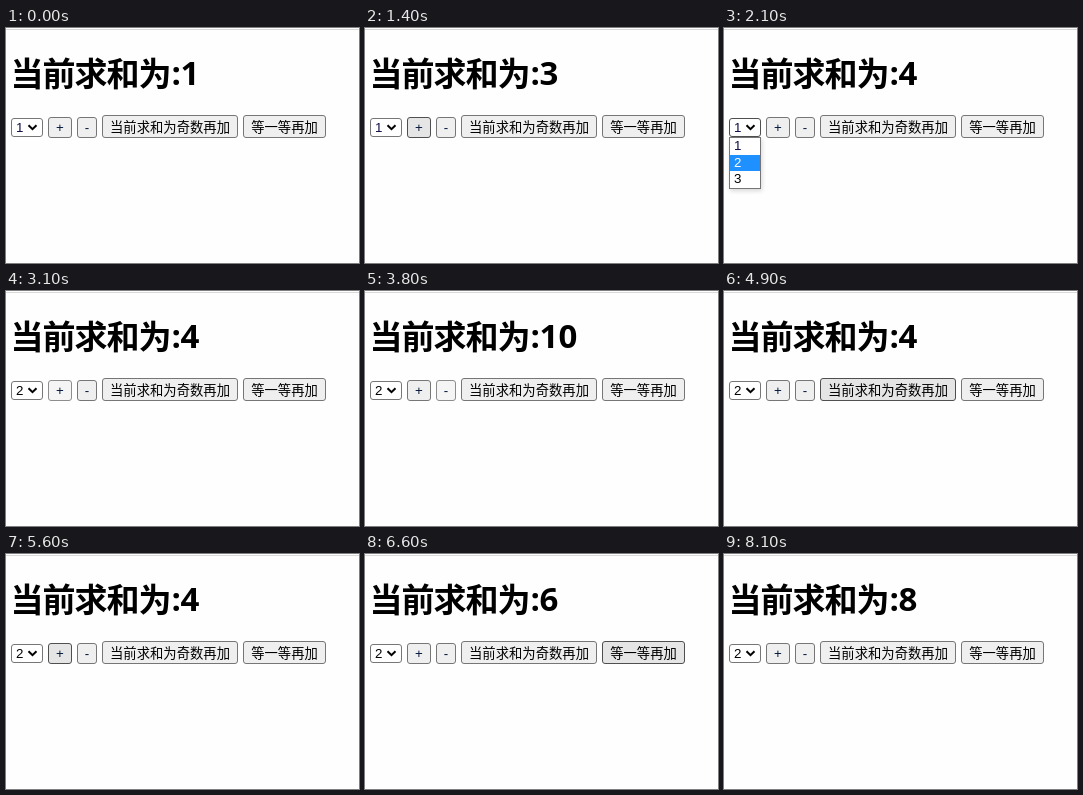
An HTML page that plays this animation: 353x235 px, repeating every 8500 ms.

```html
<!DOCTYPE html>
<html lang="zh-CN">
<head>
<meta charset="utf-8">
<title>求和</title>
<style>
  html, body { margin: 0; width: 100%; height: 100%; overflow: hidden; background: #fefefe; }
  svg { display: block; width: 353px; height: 235px; }
  text { font: 13.333px "Liberation Sans", Arial, "Noto Sans CJK SC", sans-serif; }
  .title { font: bold 33px "Noto Sans CJK SC", "Noto Sans CJK", sans-serif; letter-spacing: -1px; }
  .latin { font-family: "Open Sans", "Noto Sans", sans-serif; letter-spacing: 0; }
  .control rect { fill: #efefef; stroke: #767676; }
  .control text { text-anchor: middle; }
  .cjk text { font-family: "Noto Sans CJK SC", "Noto Sans CJK", sans-serif; font-weight: 300; }
  .hover rect { fill: #e5e5e5; stroke: #4f4f4f; }
  .press rect { fill: #f5f5f5; stroke: #8d8d8d; }
  .select rect { fill: #fff; stroke: #767676; }
  .select.hover rect { stroke: #4f4f4f; }
  .ink { fill: #001538; }
  .menu { filter: drop-shadow(1px 2px 2px rgba(0, 0, 0, .15)); }
</style>
</head>
<body>
<svg viewBox="0 0 353 235">
  <rect width="353" height="235" fill="#fefefe"/>
  <rect y="1" width="353" height="1" fill="#d9d9d9"/>
  <text class="title" x="4.5" y="58">当前求和为</text>
  <text class="title latin" x="165.5" y="57">:</text>
  <text class="title latin" id="sum" x="174.6" y="57">1</text>

  <g class="select" id="select">
    <rect x="5.5" y="90.5" width="31" height="18" rx="2.5"/>
    <text id="value" x="10" y="104">1</text>
    <path d="M22.5 97.2 L26.5 101.2 L30.5 97.2" fill="none" stroke="#000" stroke-width="2"/>
  </g>

  <g class="control" id="plus">
    <rect x="42.5" y="89.5" width="23" height="20" rx="2.5"/>
    <text class="ink" x="54" y="104">+</text>
  </g>
  <g class="control" id="minus">
    <rect x="71.5" y="89.5" width="19" height="20" rx="2.5"/>
    <text class="ink" x="81" y="104">-</text>
  </g>
  <g class="control cjk" id="odd">
    <rect x="96.5" y="87.5" width="135" height="22" rx="2.5"/>
    <text x="164" y="104">当前求和为奇数再加</text>
  </g>
  <g class="control cjk" id="wait">
    <rect x="237.5" y="87.5" width="82" height="22" rx="2.5"/>
    <text x="278.5" y="104">等一等再加</text>
  </g>

  <g class="menu" id="menu">
    <rect x="5.5" y="109.5" width="31" height="51" fill="#fff" stroke="#767676"/>
    <rect id="mark" x="6" y="127" width="30" height="16" fill="#1e90ff"/>
    <text x="10" y="122">1</text>
    <text x="10" y="139">2</text>
    <text x="10" y="155">3</text>
  </g>
</svg>
<script>
const LOOP = 8500;
const $ = id => document.getElementById(id);
const buttons = ['plus', 'minus', 'odd', 'wait'];
const options = [...$('menu').querySelectorAll('text')];

const start = { sum: 1, value: 1, over: '', down: false, select: false, menu: 0, mark: 1 };

// Each entry: time in ms and what changes then.
const steps = [
  [700, { over: 'plus' }],
  [1200, { down: true }],
  [1300, { down: false, sum: 2 }],
  [1400, { sum: 3 }],
  [1500, { sum: 4 }],
  [1700, { over: '', select: true }],
  [1900, { menu: 0.5 }],
  [2000, { menu: 1 }],
  [2100, { mark: 2 }],
  [2600, { menu: 0, value: 2 }],
  [2800, { over: 'plus' }],
  [3100, { down: true, select: false }],
  [3200, { down: false, sum: 6 }],
  [3300, { sum: 8 }],
  [3400, { sum: 10 }],
  [3600, { over: 'minus' }],
  [3800, { down: true }],
  [3900, { down: false, sum: 8 }],
  [4000, { sum: 6 }],
  [4100, { sum: 4 }],
  [4200, { over: '' }],
  [4300, { over: 'odd' }],
  [4500, { down: true }],
  [4600, { down: false }],
  [4800, { down: true }],
  [4900, { down: false }],
  [5100, { down: true }],
  [5200, { down: false }],
  [5400, { over: 'minus' }],
  [5600, { over: 'plus' }],
  [5900, { down: true }],
  [6000, { down: false, sum: 6 }],
  [6100, { over: 'odd' }],
  [6400, { over: 'wait' }],
  [6500, { down: true }],
  [6600, { down: false }],
  [7800, { sum: 8 }],
  [8100, { over: '' }]
];

function stateAt(time) {
  const state = { ...start };
  for (const [at, change] of steps) {
    if (at > time) break;
    Object.assign(state, change);
  }
  return state;
}

function draw(state) {
  $('sum').textContent = state.sum;
  $('value').textContent = state.value;
  $('value').style.fill = state.value === 1 ? '#101048' : '#000';
  $('select').classList.toggle('hover', state.select);
  for (const id of buttons) {
    const over = state.over === id;
    $(id).classList.toggle('hover', over && !state.down);
    $(id).classList.toggle('press', over && state.down);
  }
  $('menu').style.opacity = state.menu;
  $('mark').setAttribute('y', 110 + 17 * (state.mark - 1));
  options.forEach((option, i) => {
    option.style.fill = i + 1 === state.mark ? '#fff' : i ? '#000' : '#101048';
  });
}

function tick() {
  draw(stateAt(performance.now() % LOOP));
  requestAnimationFrame(tick);
}
tick();
</script>
</body>
</html>
```
